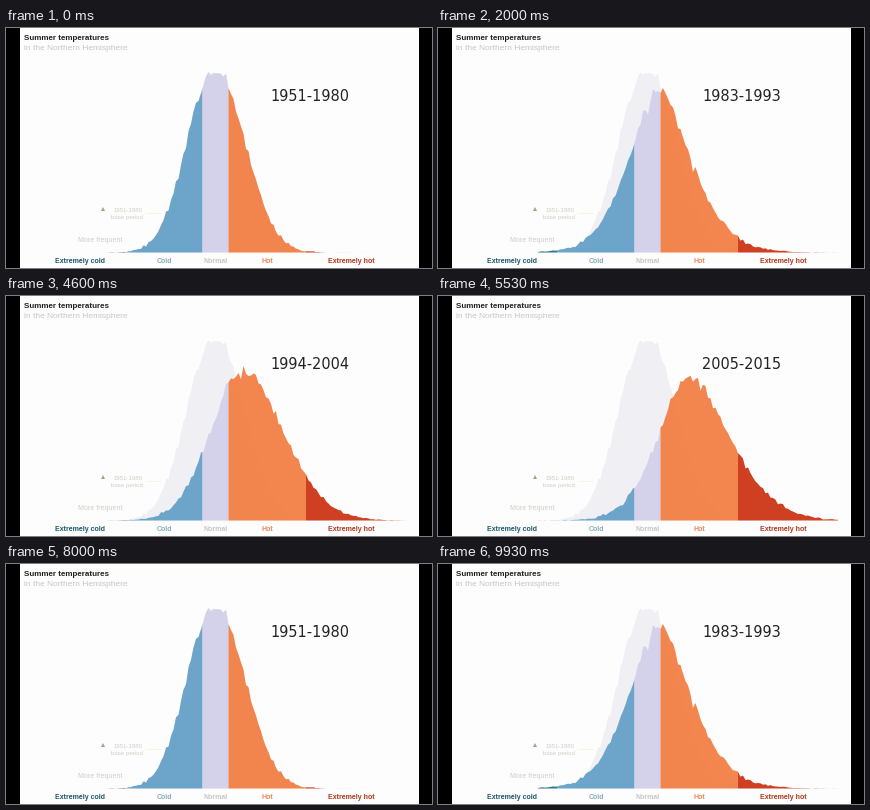
Write a matplotlib script that moves like this. It is 426 by 240 pixels and loops after 9990 ms.

```python
import numpy as np
import matplotlib.pyplot as plt
from matplotlib.animation import FuncAnimation
from matplotlib.patches import Polygon, Rectangle

W, H, DPI = 426, 240, 100
FRAMES, STEP = 150, 66.6
STAGE, MOVE_FROM, MOVE_TO = 1800, 1080, 1700
FLOOR = 224.5

# Label, peak x, peak height, then spread and exponent of the left and right flank
PERIODS = [("1951-1980", 210, 182, (40.7, 2.15), (41.2, 2.0)),
           ("1983-1993", 221, 163, (42.8, 1.7), (46, 1.6)),
           ("1994-2004", 238, 149, (46.8, 2.0), (56.4, 1.9)),
           ("2005-2015", 248, 144, (40.5, 1.65), (62, 1.87))]
BANDS = [(100, 119, "#1d6f86"), (119, 196.5, "#619fc6"), (196.5, 222.5, "#d2d0ea"),
         (222.5, 300, "#f27c3f"), (300, 400, "#cb300f")]

xs = np.arange(100, 400.5, 0.5)
rng = np.random.default_rng(4)


def profile(peak, height, left, right):
    """Two-sided bell with ragged edges, as y positions on the stage."""
    spread, power = np.where((xs < peak)[:, None], left, right).T
    bell = height * np.exp(-(np.abs(xs - peak) / spread) ** power)
    knots = np.arange(100, 403, 2.5)
    ragged = np.interp(xs, knots, rng.normal(0, 0.27, knots.size))
    return FLOOR - np.maximum(bell + ragged * np.sqrt(bell), 0)


names = [p[0] for p in PERIODS]
curves = [profile(*p[1:]) for p in PERIODS]

plt.rcParams["savefig.dpi"] = DPI
fig = plt.figure(figsize=(W / DPI, H / DPI), dpi=DPI, facecolor="#fdfdfd")
ax = fig.add_axes([0, 0, 1, 1])
ax.set_xlim(0, W)
ax.set_ylim(H, 0)
ax.axis("off")


def label(x, y, text, px, color, weight="normal", ha="left", font="Liberation Sans"):
    return ax.text(x, y, text, fontsize=px * 72 / DPI, color=color, weight=weight,
                   ha=ha, va="baseline", family=font)


def area(ys, lo, hi):
    inside = (xs >= lo) & (xs <= hi)
    top = np.column_stack([xs[inside], ys[inside]])
    return np.vstack([[lo, FLOOR], top, [hi, FLOOR]])


ax.add_patch(Polygon(area(curves[0], 100, 400), fc="#f0eff4", lw=0))
bands = [ax.add_patch(Polygon(area(curves[0], lo, hi), fc=c, lw=0, alpha=0.92))
         for lo, hi, c in BANDS]

for x in (0, 413):
    ax.add_patch(Rectangle((x, 0), 14, H, fc="black", lw=0))

label(18, 12, "Summer temperatures", 8, "#222222", "bold")
label(18, 21.5, "in the Northern Hemisphere", 8.35, "#c6c6c8")

for x, text, color in [(49, "Extremely cold", "#1b5866"), (151, "Cold", "#86aebb"),
                       (198, "Normal", "#c6c6c4"), (256, "Hot", "#e88a5c"),
                       (322, "Extremely hot", "#b3361c")]:
    label(x, 235.3, text, 7, color, "bold")

label(137, 184, "1951-1980", 6.1, "#cfcfc8", ha="right")
label(137, 191, "base period", 6.1, "#cfcfc8", ha="right")
label(72, 214, "More frequent", 7.1, "#cfcfc8")
ax.plot([140, 155], [184.5, 184.5], color="#f4f4dc", lw=0.6)
ax.add_patch(Polygon([(95, 183), (99, 183), (97, 179)], fc="#a3a382", lw=0))

years = label(304, 73.4, names[0], 14.5, "#222222", ha="center", font="DejaVu Sans")


def update(i):
    stage, t = divmod(i * STEP, STAGE)
    now = int(stage) % len(names)
    after = (now + 1) % len(names)
    u = np.clip((t - MOVE_FROM) / (MOVE_TO - MOVE_FROM), 0, 1)
    ease = u * u * (3 - 2 * u)
    ys = curves[now] * (1 - ease) + curves[after] * ease
    for band, (lo, hi, _) in zip(bands, BANDS):
        band.set_xy(area(ys, lo, hi))
    years.set_text(names[after if u > 0.3 else now])
    return [*bands, years]


anim = FuncAnimation(fig, update, frames=FRAMES, interval=STEP, repeat=True,
                     repeat_delay=0, blit=False)
plt.show()
```
